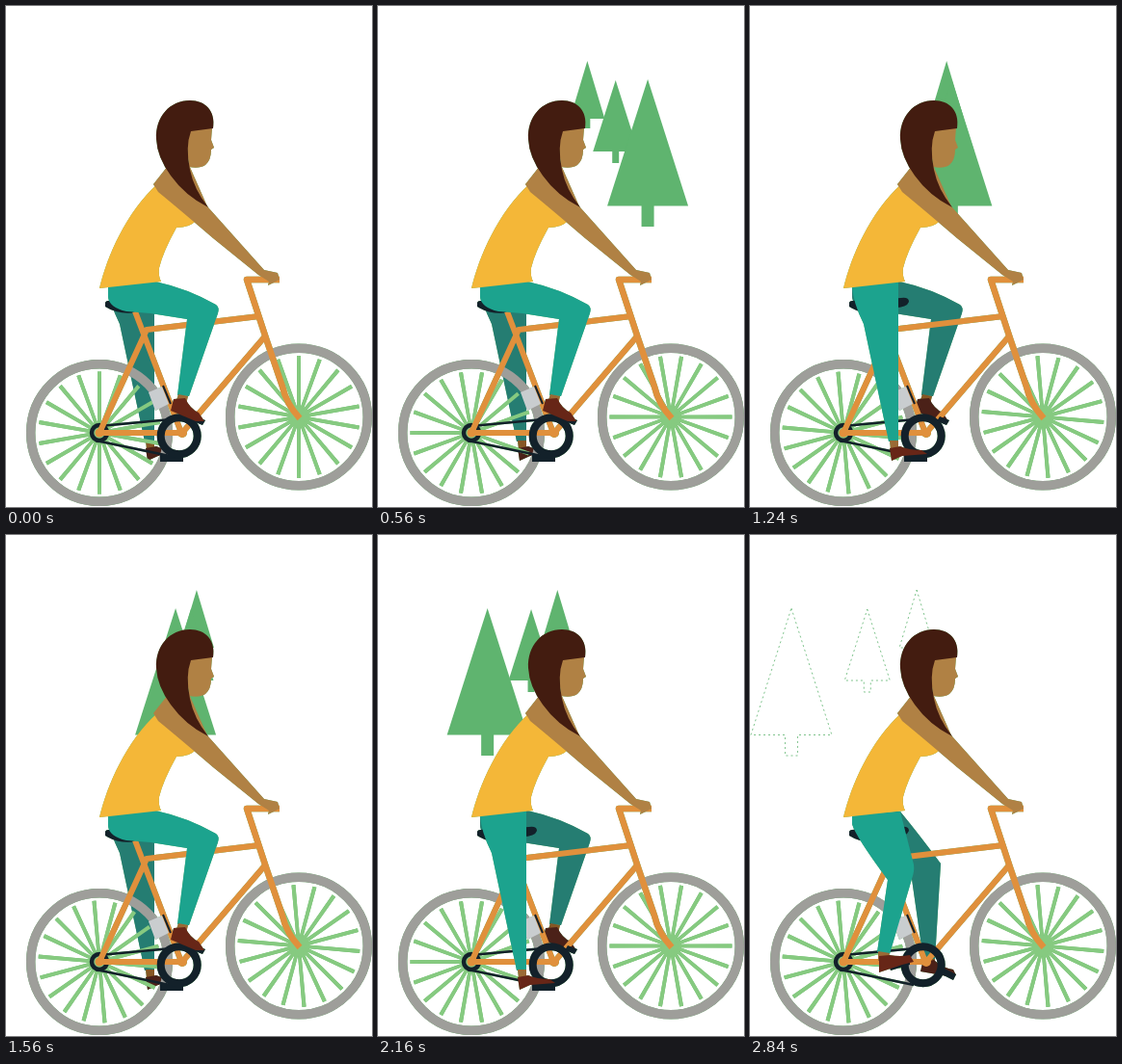
Write an HTML page that moves like this. It is 380 by 520 pixels and loops after 2880 ms.

```html
<!DOCTYPE html>
<html lang="en">
<head>
<meta charset="utf-8">
<title>Cyclist</title>
<style>
  html, body { margin: 0; width: 100%; height: 100%; overflow: hidden; background: #fff; }
  svg { display: block; width: 380px; height: 520px; }
  #cyclist { filter: drop-shadow(0 0 .6px #62b767); }
</style>
</head>
<body>
<svg viewBox="0 0 380 520">
  <g id="trees"></g>
  <g id="cyclist">
    <g id="farLeg"></g>
    <g id="wheels"></g>

    <g id="bike" fill="none" stroke-linejoin="round">
      <path d="M103 308Q104 305 111 306L157 303Q165 302 165 307Q163 313 150 313L136 318Q117 321 103 312Z" fill="#13212a"/>
      <path d="M97 436L172 429M98 452L170 467" stroke="#13212a" stroke-width="2.4"/>
      <circle cx="97" cy="443" r="8" stroke="#13212a" stroke-width="4.5"/>
      <g stroke="#e0903c" stroke-width="6">
        <path d="M134 317L182 443H97L146 336L263 322M268 344L183 443"/>
        <path d="M284 284H250L270 345L287 395Q291 413 305 428" stroke-width="6.5"/>
      </g>
      <path d="M148 401L162 395L169 413L155 420Z" fill="#c9cdcf"/>
      <path d="M163 394L171 413" stroke="#13212a" stroke-width="2"/>
      <circle cx="97" cy="443" r="4.5" fill="#e0903c"/>
      <circle cx="183" cy="443" r="5" fill="#e0903c"/>
      <path id="pedals" fill="#13212a"/>
      <circle cx="179.7" cy="446.3" r="19" stroke="#13212a" stroke-width="8"/>
    </g>

    <g id="nearLeg"></g>

    <g id="rider">
      <path fill="#f4b738" d="M97 293C105 259 125 214 157 185L197 223Q191 230 177 230Q163 255 159 272Q158 280 161 286Z"/>
      <path fill="#b08144" d="M153 185L168 166L190 165L209 208L268 274L282 277L284 284L272 290L273 286L262 279L215 241Q180 211 158 193Z"/>
      <path fill="#b08144" d="M186 128L214 126L213 139L216 147L213 149Q213 160 207 165Q201 169 190 167Z"/>
      <path fill="#431c10" d="M156 138C155 115 170 98 191 98C207 98 218 109 215 127L192 130Q186 146 191 170Q195 190 210 209Q186 197 171 176Q157 157 156 138Z"/>
    </g>
  </g>
</svg>
<script>
const LOOP = 2880, STEP = 40, HALF = 720, HOLD = 600, SPOKES = 18;
const $ = id => document.getElementById(id);

function add(parent, tag, attrs) {
  const el = document.createElementNS('http://www.w3.org/2000/svg', tag);
  for (const key in attrs) el.setAttribute(key, attrs[key]);
  parent.append(el);
  return el;
}

// x at the start, speed in px/ms, top, base, half width, trunk half width, trunk end
const trees = [
  [228.2, .0194, 57, 117, 18, 3, 127],
  [277.4, .0548, 77, 151, 23.5, 3.5, 163],
  [338.3, .104, 76, 207.5, 42, 6.5, 229]
].map(([x, speed, top, base, half, trunk, end]) => ({
  x, speed,
  el: add($('trees'), 'path', {
    d: `M0 ${top}L${half} ${base}H${trunk}V${end}H${-trunk}V${base}H${-half}Z`,
    'stroke-width': .8, 'stroke-dasharray': '2 3'
  })
}));

const wheels = [[97, 443], [304, 426.5]].map(([x, y]) => {
  const wheel = add($('wheels'), 'g', { transform: `translate(${x} ${y})` });
  add(wheel, 'circle', { r: 71.3, fill: 'none', stroke: '#9e9e9a', 'stroke-width': 9.4 });
  const spokes = add(wheel, 'g', { fill: '#86ca80' });
  add(spokes, 'circle', { r: 11 });
  for (let i = 0; i < SPOKES; i++)
    add(spokes, 'path', { d: 'M-1.7 0L-2 -63.5H2L1.7 0Z', transform: `rotate(${i * 360 / SPOKES})` });
  return spokes;
});

// Trousers, ankle and shoe for each position of the foot
const poses = {
  up: [
    'M106 291L155 286Q188 293 218 310Q222 313 220 319L190 405L178 404L188 325L150 319L125 317Q107 313 106 302Z',
    'M179 403L189 405L187 413L176 412Z',
    'M174 408L186 407Q191 418 200 422L206 431L197 431L171 420Z'
  ],
  right: [
    'M106 291L156 287Q175 310 198 341L192 441H180L167 350L150 310L107 302Z',
    'M180 440H192V446H180Z',
    'M179 444L191 441Q199 449 211 451L214 457L205 458L177 453Z'
  ],
  down: [
    'M106 291L154 286V452H144L118 330Q107 308 106 291Z',
    'M145 451H154V460H146Z',
    'M145 459L156 457Q165 461 178 461L184 465L158 467L147 472Z'
  ],
  left: [
    'M106 291L156 287L170 342Q171 349 168 357L145 435L132 433L143 358Q109 312 106 300Z',
    'M133 432L145 434L143 442H133Z',
    'M134 437L145 436Q156 438 166 436L170 443L158 446L134 454Z'
  ]
};
const pedals = {
  still: 'M197 426L207 430L204 435L194 431ZM160 466H184V473H160Z',
  cross: 'M202 450L214 456L211 462L199 456ZM144 446L166 441V446L146 452Z'
};

function leg(id, ...colors) {
  const parts = colors.map(fill => add($(id), 'path', { fill }));
  return pose => parts.forEach((part, i) => part.setAttribute('d', poses[pose][i]));
}
const nearLeg = leg('nearLeg', '#1ca38e', '#9a6a35', '#672617');
const farLeg = leg('farLeg', '#257d72', '#865724', '#4b2118');

const PALE = [134, 202, 128], GREEN = [95, 180, 111];
const mix = k => `rgb(${PALE.map((v, i) => Math.round(v + (GREEN[i] - v) * k))})`;

function draw(t) {
  const fade = Math.min(1, t / 288, (LOOP - t) / 288);
  const solid = fade > .15;
  for (const { x, speed, el } of trees) {
    el.setAttribute('transform', `translate(${x - speed * t} 0)`);
    el.setAttribute('fill', solid ? mix(fade) : 'none');
    el.setAttribute('stroke', solid || !fade ? 'none' : mix(1));
  }

  for (const spokes of wheels) spokes.setAttribute('transform', `rotate(${t * 360 / LOOP})`);

  const crossing = t % HALF >= HOLD;
  const cycle = crossing ? ['right', 'left'] : ['up', 'down'];
  const turn = Math.floor(t / HALF) % 2;
  nearLeg(cycle[turn]);
  farLeg(cycle[1 - turn]);
  $('pedals').setAttribute('d', crossing ? pedals.cross : pedals.still);
}

const start = performance.now();
function tick(now) {
  const t = Math.max(0, now - start) % LOOP;
  draw(Math.floor(t / STEP) * STEP);
  requestAnimationFrame(tick);
}
draw(0);
requestAnimationFrame(tick);
</script>
</body>
</html>
```
